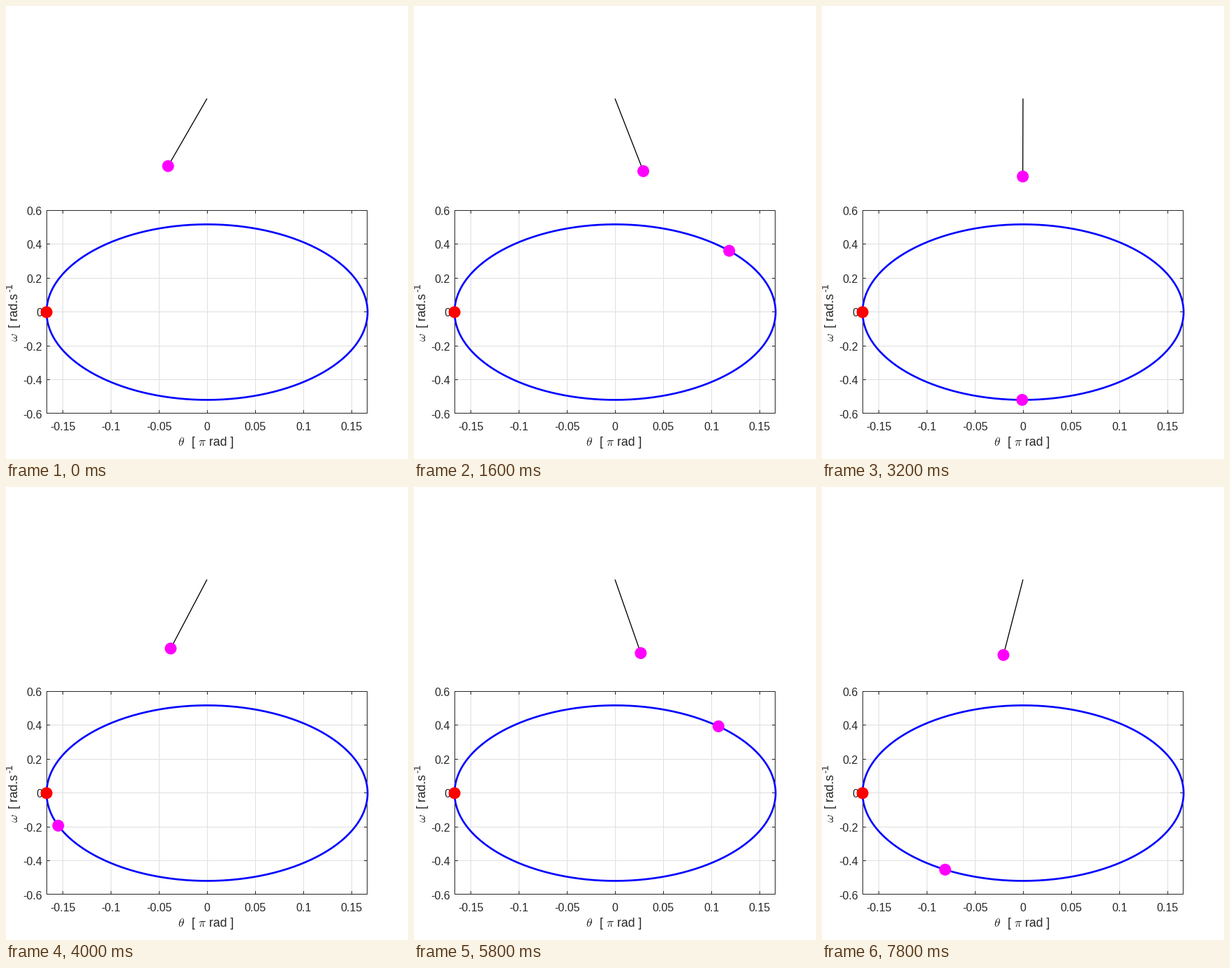
Recreate the animation shown at these times as a matplotlib script. Size 576 px wide and 648 px high, loop 8 s.

```python
import numpy as np
import matplotlib.pyplot as plt
from matplotlib.animation import FuncAnimation

W, H, DPI = 576, 648, 100
PX = 72 / DPI                      # points per pixel
FRAMES, INTERVAL, DT = 40, 200, 0.3

INK = "#262626"
GRID = "#dfdfdf"
MAGENTA = "#ff00ff"

plt.rcParams["font.family"] = "Liberation Sans"
plt.rcParams["mathtext.fontset"] = "cm"

# Pendulum released at rest from -30 degrees, with g/l = 1.
# phi is the phase: sin(theta/2) = K sin(phi), omega = 2 K cos(phi).
THETA_MAX = np.pi / 6
K = np.sin(THETA_MAX / 2)


def state(phi):
    return 2 * np.arcsin(K * np.sin(phi)), 2 * K * np.cos(phi)


def phases(count, substeps=20):
    def rate(p):
        return np.sqrt(1 - (K * np.sin(p)) ** 2)

    h = DT / substeps
    phi, out = -np.pi / 2, []
    for _ in range(count):
        out.append(phi)
        for _ in range(substeps):
            a = rate(phi)
            b = rate(phi + h * a / 2)
            c = rate(phi + h * b / 2)
            d = rate(phi + h * c)
            phi += h * (a + 2 * b + 2 * c + d) / 6
    return out


# Pixel geometry
PIVOT, ROD = (288, 132.4), 111.5
CX, CY, HALF_W, HALF_H = 288.1, 437.9, 230, 145.5
LEFT, RIGHT, TOP, BOTTOM = 58, 517, 292, 582
TICK = 5


def to_px(theta, omega):
    return CX + HALF_W * theta / THETA_MAX, CY - HALF_H * omega / 0.6


def bob_px(theta):
    return PIVOT[0] + ROD * np.sin(theta), PIVOT[1] + ROD * np.cos(theta)


fig = plt.figure(figsize=(W / DPI, H / DPI), dpi=DPI, facecolor="white")
ax = fig.add_axes([0, 0, 1, 1])
ax.set_xlim(0, W)
ax.set_ylim(H, 0)
ax.axis("off")


def line(xs, ys, color, width, z, cap="butt"):
    return ax.plot(xs, ys, color=color, lw=width * PX, zorder=z,
                   solid_capstyle=cap)[0]


def rule(xs, ys, color, z):
    line(xs, ys, color, 1, z, "projecting")


def dot(x, y, color, z):
    return ax.add_patch(plt.Circle((x, y), 8.5, fc=color, lw=0, zorder=z))


def label(x, y, text, size=16, ha="left", angle=0):
    ax.text(x, y, text, size=size * PX, color=INK, ha=ha, va="baseline",
            rotation=angle, rotation_mode="anchor", zorder=3)


# Grid, ticks and tick labels; rules sit on whole pixels
for i in range(-3, 4):
    x = np.floor(to_px(0.05 * i * np.pi, 0)[0])
    rule([x, x], [TOP, BOTTOM], GRID, 1)
    rule([x, x], [TOP, TOP + TICK - 1], INK, 2)
    rule([x, x], [BOTTOM - TICK + 1, BOTTOM], INK, 2)
    label(x, 607, f"{0.05 * i:.2g}", ha="center")

for i in range(-3, 4):
    y = np.floor(to_px(0, 0.2 * i)[1])
    if abs(i) < 3:
        rule([LEFT, RIGHT], [y, y], GRID, 1)
        rule([LEFT, LEFT + TICK - 1], [y, y], INK, 2)
        rule([RIGHT - TICK + 1, RIGHT], [y, y], INK, 2)
    label(52, y + 7, f"{0.2 * i:.1g}", ha="right")

rule([LEFT, RIGHT, RIGHT, LEFT, LEFT], [TOP, TOP, BOTTOM, BOTTOM, TOP], INK, 2)

# Axis titles
for x, text in [(246.5, r"$\theta$"), (265.5, "["), (275, r"$\pi$"),
                (291, "rad ]")]:
    label(x, 629, text, 17.6)
for x, y, text, size in [(17, 480.5, r"$\omega$", 17.6),
                         (17, 460, "[ rad.s", 17.6),
                         (9, 409, "-1", 14.1)]:
    label(x, y, text, size, angle=90)

# Phase orbit and moving parts
orbit = to_px(*state(np.linspace(0, 2 * np.pi, 400)))
line(*orbit, "#0000ff", 2.67, 4)
start = dot(*to_px(-THETA_MAX, 0), "#ff0000", 6)
marker = dot(0, 0, MAGENTA, 5)
rod = line([], [], "black", 1.33, 4)
bob = dot(0, 0, MAGENTA, 5)

PHASES = phases(FRAMES)


def draw(n):
    theta, omega = state(PHASES[n])
    tip = bob_px(theta)
    rod.set_data([PIVOT[0], tip[0]], [PIVOT[1], tip[1]])
    bob.center = tip
    # At the release point the marker lies wholly under the start dot.
    marker.center = to_px(theta, omega)
    marker.set_visible(n > 0)
    return rod, bob, marker


anim = FuncAnimation(fig, draw, frames=FRAMES, interval=INTERVAL,
                     repeat=True, repeat_delay=0, blit=False)
plt.show()
```
